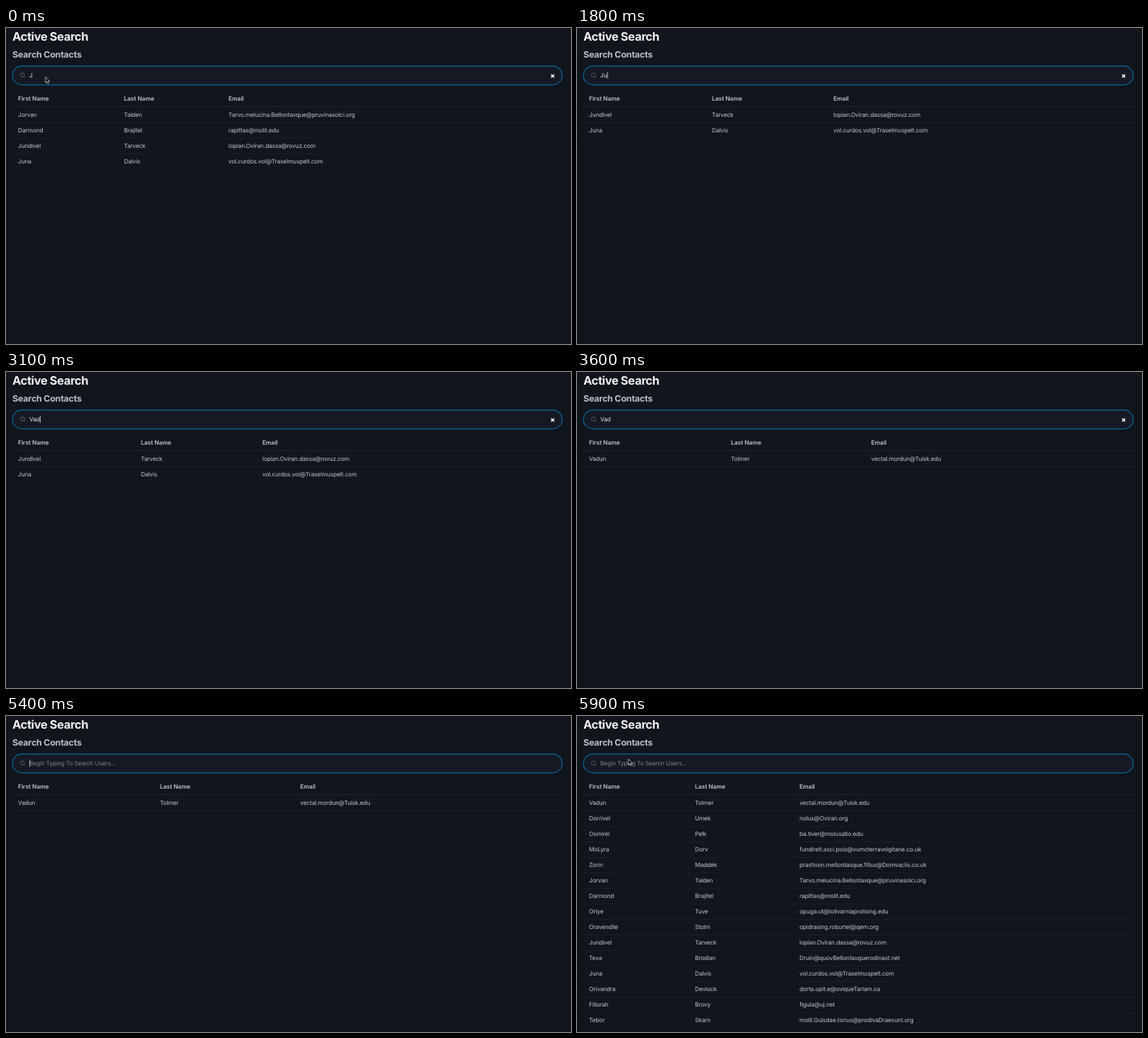
These frames come from a looping animation (800 by 448 pixels, 6 s). An HTML page with a canvas:

```html
<!DOCTYPE html>
<html lang="en">
<head>
<meta charset="utf-8">
<title>Active Search</title>
<style>
  html, body { margin: 0; width: 100%; height: 100%; overflow: hidden; background: #11151c; }
  canvas { display: block; }
</style>
</head>
<body>
<canvas id="stage" width="800" height="448"></canvas>
<script>
const ctx = document.getElementById('stage').getContext('2d');
const LOOP = 6000;

const contacts = [
  ['Vadun', 'Tolmer', 'vectal.mordun@Tuisk.edu'],
  ['Dorrivel', 'Umek', 'nolus@Oviran.org'],
  ['Osmirel', 'Pelk', 'ba.tiver@molusatio.edu'],
  ['MoLyra', 'Dorv', 'fundirelt.asci.pois@vumcterravolgitane.co.uk'],
  ['Zorin', 'Maddek', 'prastivon.mellordasque.fillus@Domvaciis.co.uk'],
  ['Jorvan', 'Talden', 'Tarvo.melucina.Bellontavque@pruvinasolci.org'],
  ['Darmond', 'Brajitel', 'rapittas@molit.edu'],
  ['Orlye', 'Tuve', 'opuga.ut@tolivarniaprolising.edu'],
  ['Oravendile', 'Stolm', 'opidrasing.roburtel@qem.org'],
  ['Jundivel', 'Tarveck', 'lopian.Oviran.dassa@rovuz.com'],
  ['Teva', 'Brodlan', 'Druin@quovBellontavquerodinast.net'],
  ['Juna', 'Dalvis', 'vol.curdos.vol@Traselmuspelt.com'],
  ['Orivandra', 'Devlock', 'dorta.opit.e@oviqueTarlam.ca'],
  ['Fillorah', 'Brovy', 'figula@uj.net'],
  ['Tebor', 'Skarn', 'molit.Guisdae.torius@prodivaDraesunt.org']
];

// Each track lists [start time, value]; a value holds until the next one.
const queryTrack = [
  [0, 'J'], [300, 'Ju'], [500, 'Jun'], [1800, 'Ju'], [1900, 'J'], [2100, ''],
  [2500, 'V'], [2800, 'Va'], [3100, 'Vad'], [3800, 'Vadu'], [4200, 'Vadun'],
  [5000, 'Vadu'], [5100, 'Vad'], [5200, 'Va'], [5300, 'V'], [5400, '']
];
const caretTrack = [
  [0, false], [300, true], [1100, false], [1600, true], [3600, false],
  [3800, true], [4700, false], [5000, true], [5900, false]
];
const tableTrack = [
  [0, { ids: [5, 6, 9, 11], cols: [17, 167, 315] }],
  [1100, { ids: [9, 11], cols: [17, 191, 363] }],
  [3600, { ids: [0], cols: [17, 218, 416.5] }],
  [5900, { ids: contacts.map((_, i) => i), cols: [17, 167, 315] }]
];
const pointerTrack = [
  [0, [56, 69.5]], [200, null], [5800, [76, 59]], [5900, [72.8, 61]]
];

function valueAt(track, time) {
  let value = track[0][1];
  for (const [start, next] of track) if (time >= start) value = next;
  return value;
}

function text(str, x, y, color, { size = 8.4, weight = 400, spacing = -0.15 } = {}) {
  ctx.font = `${weight} ${size}px Inter, sans-serif`;
  ctx.letterSpacing = spacing + 'px';
  ctx.fillStyle = color;
  ctx.fillText(str, x, y);
  return ctx.measureText(str).width;
}

function path(points, close) {
  ctx.beginPath();
  points.forEach(([x, y]) => ctx.lineTo(x, y));
  if (close) ctx.closePath();
}

function stroke(color, width) {
  ctx.strokeStyle = color;
  ctx.lineWidth = width;
  ctx.stroke();
}

function drawSearchBox(query, caret) {
  ctx.beginPath();
  ctx.roundRect(9.1, 53.9, 778.4, 26.7, 13.35);
  ctx.fillStyle = '#151a22';
  ctx.fill();
  stroke('#0a679b', 1.2);

  ctx.beginPath();
  ctx.arc(23.3, 66.7, 2.9, 0, Math.PI * 2);
  stroke('#687080', 0.75);
  path([[25.4, 68.8], [27.3, 70.6]]);
  stroke('#687080', 0.75);

  let width = 0;
  if (query) {
    width = text(query, 33, 70.2, '#e0e3e7');
    path([[771.8, 65.9], [776.2, 70.3]]);
    stroke('#f4f5f7', 1.5);
    path([[776.2, 65.9], [771.8, 70.3]]);
    stroke('#f4f5f7', 1.5);
  } else {
    text('Begin Typing To Search Users...', 33, 70.2, '#7d8594');
  }
  if (caret) {
    ctx.fillStyle = '#e0e3e7';
    ctx.fillRect(33.3 + width, 62.3, 0.8, 9.6);
  }
}

function drawTable({ ids, cols }) {
  ['First Name', 'Last Name', 'Email'].forEach((label, i) =>
    text(label, cols[i], 103.1, '#c2c7d0', { weight: 600, spacing: 0 }));
  ctx.fillStyle = '#232934';
  ctx.fillRect(9, 111, 779, 1);
  ids.forEach((id, row) => {
    const y = 123 + row * 22;
    contacts[id].forEach((cell, i) => text(cell, cols[i], y + 3.1, '#c2c7d0'));
    ctx.fillStyle = '#1a1f28';
    ctx.fillRect(9, y + 11, 779, 1);
  });
}

function drawPointer([x, y]) {
  const outline = [[0, 0], [0, 8.2], [1.9, 6.5], [3.2, 9.3], [4.5, 8.7], [3.3, 6], [5.8, 5.8]];
  path(outline.map(([dx, dy]) => [x + dx, y + dy]), true);
  ctx.fillStyle = '#050608';
  ctx.fill();
  stroke('#d5d8dc', 0.8);
}

function draw(time) {
  ctx.fillStyle = '#11151c';
  ctx.fillRect(0, 0, 800, 448);
  text('Active Search', 9, 18.4, '#f0f1f3', { size: 16.6, weight: 700, spacing: -0.42 });
  text('Search Contacts', 9, 42.3, '#b9bec8', { size: 12.5, weight: 700, spacing: -0.22 });
  drawSearchBox(valueAt(queryTrack, time), valueAt(caretTrack, time));
  drawTable(valueAt(tableTrack, time));
  const pointer = valueAt(pointerTrack, time);
  if (pointer) drawPointer(pointer);
}

ctx.textRendering = 'geometricPrecision';
const origin = performance.now();
function tick() {
  draw((performance.now() - origin) % LOOP);
  requestAnimationFrame(tick);
}
tick();
</script>
</body>
</html>
```
